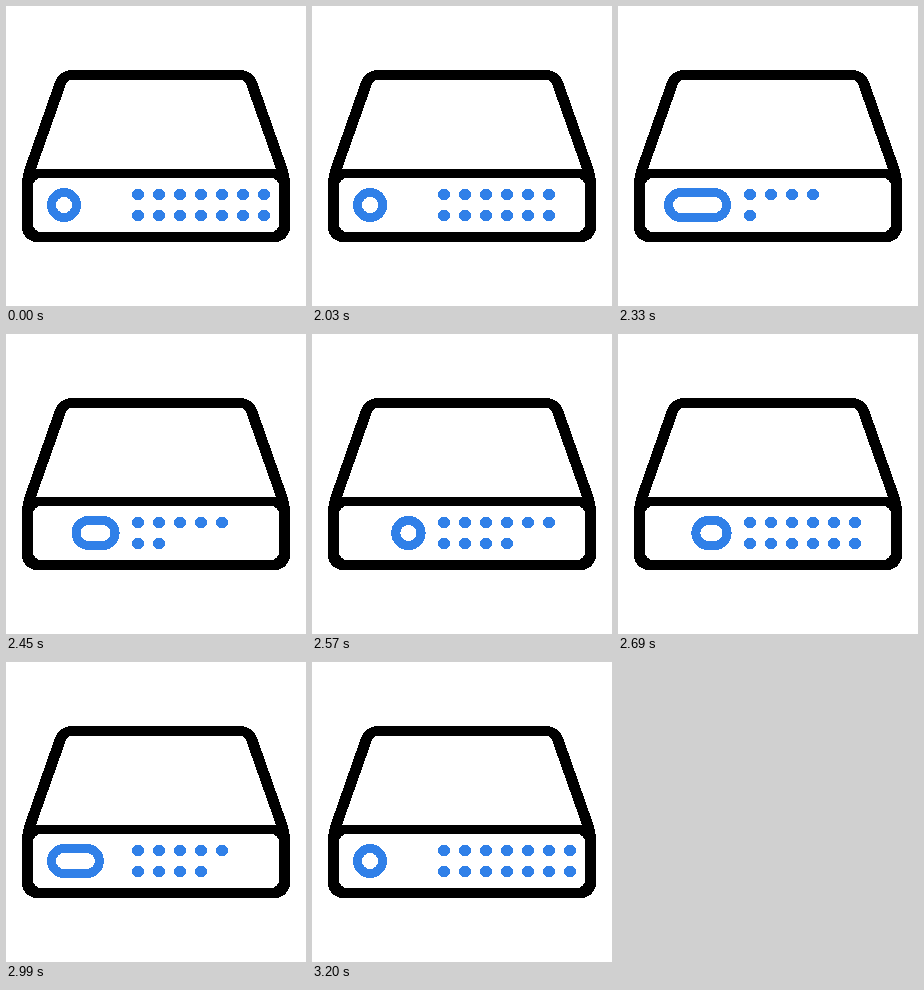
Recreate the animation shown at these times as an HTML page. Size 300x300 px, loop 3230 ms.

```html
<!DOCTYPE html>
<html lang="en">
<head>
<meta charset="utf-8">
<title>Server</title>
<style>
html, body { margin: 0; width: 100%; height: 100%; overflow: hidden; background: #fff; }
svg { display: block; width: 100%; height: 100%; }
</style>
</head>
<body>
<svg viewBox="0 0 300 300" shape-rendering="crispEdges">
  <path d="M16 178 Q16 170 18.8 162 L48.8 76.3 A18 18 0 0 1 66 64 H234 A18 18 0 0 1 251.2 76.3
    L281.2 162 Q284 170 284 178 V221 A15 15 0 0 1 269 236 H31 A15 15 0 0 1 16 221 Z"/>
  <path fill="#fff" d="M30 163 L60 78 A6 6 0 0 1 65.6 74 H234.4 A6 6 0 0 1 240 78 L270 163 Z"/>
  <rect fill="#fff" x="27" y="172" width="246" height="54" rx="8"/>
  <rect id="pill" y="186.5" height="25" rx="12.5" fill="none" stroke="#3080e8" stroke-width="9"/>
  <g id="dots" fill="#3080e8"></g>
</svg>
<script>
const LOOP = 3230, START = 2030, STEP = 30, MOVE = 340, TRAVEL = 38.6;
const pill = document.getElementById('pill');
const dots = document.getElementById('dots');

// [time, number of lit dots] for each row
const levels = [
  [[2000, 7], [2200, 3], [2640, 7], [2870, 3.5], [3130, 7]],
  [[2000, 7], [2330, 1], [2700, 6.5], [2870, 3], [3200, 7]]
];

const rows = [188.5, 209.5].map(y => Array.from({ length: 7 }, (_, i) => {
  const dot = document.createElementNS('http://www.w3.org/2000/svg', 'circle');
  dot.setAttribute('cx', 132 + 21 * i);
  dot.setAttribute('cy', y);
  dot.setAttribute('r', 6);
  return dots.appendChild(dot);
}));

function ease(t, from) {
  const u = Math.min(1, Math.max(0, (t - from) / MOVE));
  return (1 - Math.cos(Math.PI * u)) / 2;
}

function levelAt(keys, t) {
  const next = keys.findIndex(k => k[0] > t);
  if (next < 1) return 7;
  const [t0, a] = keys[next - 1], [t1, b] = keys[next];
  return a + (b - a) * (t - t0) / (t1 - t0);
}

function draw(time) {
  let t = time % LOOP;
  t = t < START ? 0 : START + Math.floor((t - START) / STEP) * STEP;

  const right = TRAVEL * (ease(t, 2015) - ease(t, 2840));
  const left = TRAVEL * (ease(t, 2250) - ease(t, 2600));
  pill.setAttribute('x', 45.5 + left);
  pill.setAttribute('width', 25 + right - left);

  rows.forEach((row, r) => {
    const lit = Math.floor(levelAt(levels[r], t));
    row.forEach((dot, i) => dot.setAttribute('visibility', i < lit ? 'visible' : 'hidden'));
  });
}

const origin = performance.now();
function tick() {
  draw(performance.now() - origin);
  requestAnimationFrame(tick);
}
tick();
</script>
</body>
</html>
```
